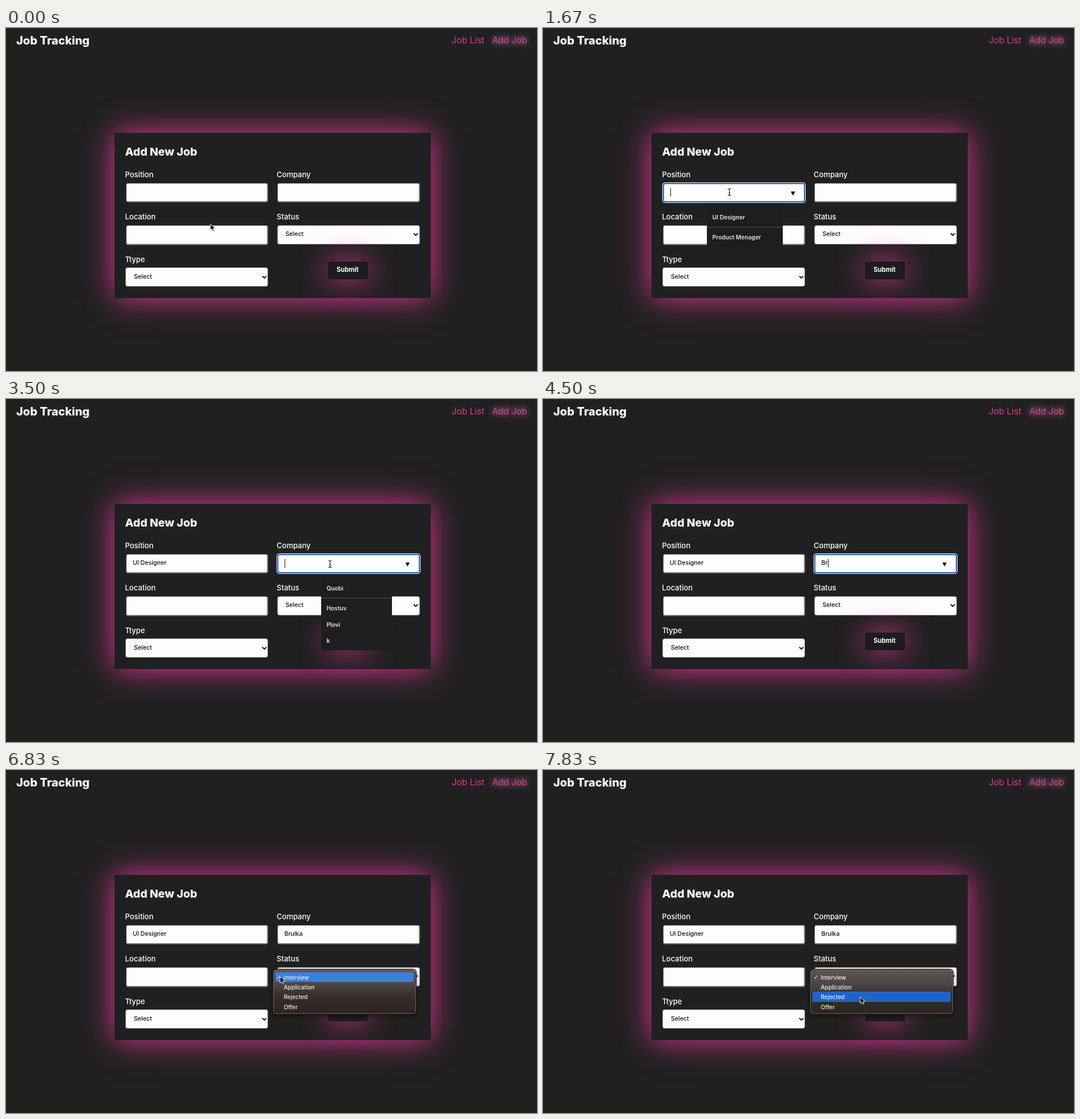
These frames come from a looping animation (930x602 px, 8 s). An HTML page:

```html
<!DOCTYPE html>
<html lang="en">
<head>
<meta charset="utf-8">
<title>Job Tracking</title>
<style>
  html, body { margin: 0; width: 100%; height: 100%; overflow: hidden; background: #202020; }
  body { position: relative; font: 500 13px/1 Inter, sans-serif; color: #fff; }
  div, svg { position: absolute; box-sizing: border-box; }
  .text { white-space: pre; transform: translateY(-50%); }
  .brand { font-size: 20px; font-weight: 800; }
  .link { font-size: 15.4px; font-weight: 400; color: #e0389a; }
  .active { text-shadow: 0 0 12px #e8a8c8; }
  .title { font-size: 19.4px; font-weight: 800; }
  .value { font-size: 10.6px; color: #111; }
  .button { font-size: 11.2px; font-weight: 700; }
  .card { background: #202020; box-shadow: 0 0 50px #e0389a; }
  .submit { background: #1d1b1d; border-radius: 4px; box-shadow: 0 0 50px #e0389a; }
  .input, .select { background: #fdfdfd; border: 1px solid #777; border-radius: 4px; }
  .input { border-width: 1px 2px 2px 1px; border-color: #555 #888 #777 #444; }
  .focus { border: 2px solid #1c57b4; box-shadow: 0 0 0 1px #fff; }
  .caret { width: 1px; height: 15px; background: #111; top: 281px; }
  .arrow { background: #000; clip-path: polygon(0 0, 100% 0, 50% 100%); }
  .popup { background: #1e1e20; border-radius: 5px; overflow: hidden; }
  .rule { background: #505052; }
  .hover { background: #3a3a3d; }
  .item { font-size: 10.2px; font-weight: 600; color: #e6e6e6; }
  .menu { border: 1px solid #6c6563; border-radius: 5px; box-shadow: 0 0 0 1px #151515, 0 3px 8px #0008;
    background: linear-gradient(#5c5654, #4a4341 36%, #372e2b 60%, #2d2422); }
  .mark { border-radius: 3px; }
  .option { font-size: 10px; color: #f4f0ee; }
  .check { font: 10px/1 "DejaVu Sans", sans-serif; }
</style>
</head>
<body>
<script>
const TICKS_PER_MS = 0.006, TICKS = 48;
const COMPANY = "Brulka", KEY_TICKS = [26, 27, 29, 30, 32, 37];
const POSITION = "UI Designer";

function add(cls, x, y, parent = document.body) {
  const el = document.createElement("div");
  el.className = cls;
  el.style.left = x + "px";
  el.style.top = y + "px";
  parent.append(el);
  return el;
}
function text(cls, x, y, str, parent) {
  const el = add("text " + cls, x, y, parent);
  el.textContent = str;
  return el;
}
function box(cls, x, y, w, h, parent) {
  const el = add(cls, x, y, parent);
  el.style.width = w + "px";
  el.style.height = h + "px";
  return el;
}
function show(el, on) {
  el.style.visibility = on ? "inherit" : "hidden";
}

text("brand", 18, 21.5, "Job Tracking");
text("link", 780.5, 21.5, "Job List");
text("link active", 851.5, 21.5, "Add Job");
box("card", 189.5, 184, 554, 290);
text("title", 208.5, 217.5, "Add New Job");

function select(x, y) {
  box("select", x, y, 250, 34);
  text("value", x + 15, y + 16.5, "Select");
  const icon = add("", x + 238.5, y + 13.5);
  icon.innerHTML = '<svg width="9" height="7"><path d="M1 1.5 4.5 5 8 1.5" fill="none" stroke="#111" stroke-width="1.8"/></svg>';
}
function input(x, y) {
  const frame = box("input", x, y, 249.5, 34.5);
  const value = text("value", x + 12.5, y + 16.5, "");
  const caret = add("caret", x + 13, y + 9.5);
  const arrow = box("arrow", x + 224.5, y + 15.5, 7.5, 7);
  return (str, focused, caretOn) => {
    frame.className = focused ? "input focus" : "input";
    value.textContent = str;
    caret.style.left = x + 12.5 + (str ? value.offsetWidth : 0.5) + "px";
    show(caret, focused && caretOn);
    show(arrow, focused);
  };
}

text("", 208.5, 257, "Position");
text("", 474, 257, "Company");
text("", 208.5, 331, "Location");
text("", 474, 331, "Status");
text("", 208.5, 406, "Ttype");
const setPosition = input(209.5, 271.5);
const setCompany = input(475, 271.5);
input(209.5, 346)("", false);
select(474.5, 345.5);
select(209, 420);
box("submit", 564, 409.5, 69.5, 31.5);
text("button", 579, 424.5, "Submit");

function popup(x, w, h, names) {
  const el = box("popup", x, 313, w, h);
  el.hover = box("hover", 0, 0, w, 35, el);
  box("rule", 0, 35.5, w, 1, el);
  names.forEach((name, i) => text("item", 9.5, i ? 25.5 + 28.5 * i : 18.5, name, el));
  return el;
}
const jobs = popup(287, 133, 73, [POSITION, "Product Menager"]);
const firms = popup(552, 124, 128, ["Quobi", "Hostuv", "Plovi", "k"]);

const menu = box("menu", 467.5, 349.5, 250.5, 78);
const mark = box("mark", 3, 4, 242.5, 17.5, menu);
text("option check", 5.5, 13, "✓", menu);
["Interview", "Application", "Rejected", "Offer"]
  .forEach((name, i) => text("option", 18, 13 + 17.4 * i, name, menu));

function cursor(path) {
  const el = add("", 0, 0);
  el.innerHTML = `<svg width="1" height="1" overflow="visible">${path}</svg>`;
  return el;
}
const pointer = cursor('<path d="M0 0V11.5L2.7 9 4.4 13.2 6.4 12.3 4.7 8.3H8.3Z" fill="#000" stroke="#fff" stroke-width=".9"/>');
const bar = "M-3-6Q0-6 0-4Q0-6 3-6M0-5V5M-3 6Q0 6 0 4Q0 6 3 6M-1.5 1.5H1.5";
const beam = cursor(`<g fill="none"><path d="${bar}" stroke="#fff" stroke-width="2.6"/><path d="${bar}" stroke="#111" stroke-width="1.1"/></g>`);

// Pointer stops: tick, x, y
const PATH = [[0, 358, 343.5], [1, 358, 343.5], [4, 326.5, 288], [10, 326.5, 288],
  [13, 338, 337], [16, 338, 337.5], [19, 567.5, 289.5], [37, 567.5, 289.5],
  [41, 480, 362.5], [43, 480, 362.5], [46, 552, 393], [47, 555.5, 398]];

function pointerAt(n) {
  const i = Math.max(1, PATH.findIndex(p => p[0] >= n));
  const [t0, x0, y0] = PATH[i - 1], [t1, x1, y1] = PATH[i];
  const k = (n - t0) / (t1 - t0), e = k * k * (3 - 2 * k);
  return [x0 + (x1 - x0) * e, y0 + (y1 - y0) * e];
}

function draw(n) {
  const [x, y] = pointerAt(n);
  const typed = KEY_TICKS.filter(k => k <= n).length;
  const lastInput = Math.max(...[4, 14, 20, ...KEY_TICKS].filter(k => k <= n));
  const caretOn = (n - lastInput) % 6 < 3;

  setPosition(n >= 14 ? POSITION : "", n >= 4 && n < 20, caretOn);
  setCompany(COMPANY.slice(0, typed), n >= 20 && n < 41, caretOn);
  show(jobs, n >= 4 && n < 14);
  show(jobs.hover, y > 313 && n < 14);
  show(firms, n >= 20 && !typed);
  show(firms.hover, false);

  show(menu, n >= 41);
  const row = Math.max(0, Math.floor((y - 354.5) / 17.4));
  mark.style.top = 4 + 17.4 * row + "px";
  mark.style.background = row ? "#2064c8" : "#3a7fda";

  const overField = y > 272 && y < 305;
  const visible = !typed || n >= 38;
  show(beam, visible && overField);
  show(pointer, visible && !overField);
  for (const el of [beam, pointer]) el.style.transform = `translate(${x}px, ${y}px)`;
}

let start;
function frame(now) {
  start ??= now;
  draw(Math.floor((now - start) * TICKS_PER_MS + 0.03) % TICKS);
  requestAnimationFrame(frame);
}
draw(0);
requestAnimationFrame(frame);
</script>
</body>
</html>
```
